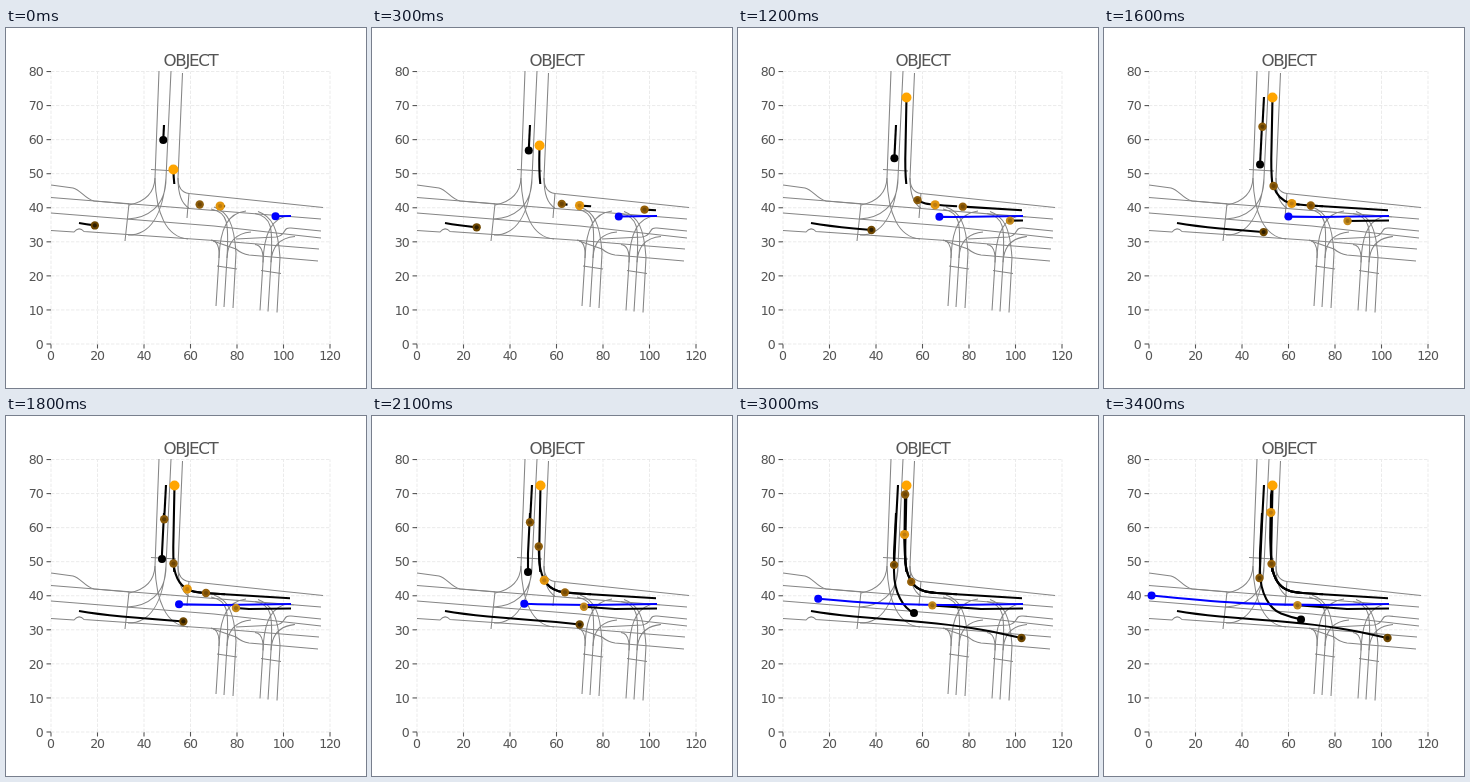
An HTML page for the animation above (3.5 s loop, 360 px wide and 360 px high).

```html
<!DOCTYPE html>
<html lang="en">
<head>
<meta charset="utf-8">
<title>Object tracks</title>
<style>
  html, body { margin: 0; width: 100%; height: 100%; overflow: hidden; background: #fff; }
  svg { display: block; width: 360px; height: 360px; }
  text { font: 12.5px "DejaVu Sans", sans-serif; letter-spacing: -1.1px; fill: #555; }
  .title { font-size: 16.67px; letter-spacing: -1.3px; text-anchor: middle; }
  .x { text-anchor: middle; }
  .y { text-anchor: end; }
  .grid { stroke: #e9e9e9; stroke-width: .9; stroke-dasharray: 3.4 1.6; }
  .tick { stroke: #555; stroke-width: 1.1; }
  #roads { fill: none; stroke: #858585; stroke-width: 1.05; }
  #trails { fill: none; stroke: #000; stroke-width: 2.1; stroke-linejoin: round; }
</style>
</head>
<body>
<svg viewBox="0 0 360 360">
  <g id="axes"></g>
  <text class="title" x="184.5" y="38">OBJECT</text>
  <g id="roads">
    <!-- main road -->
    <path d="M45 157L67 160C75 162 79 171 88 173L123 176"/>
    <path d="M45 169.500L183 180.500L315 191"/>
    <path d="M45 185L208 198L315 210"/>
    <path d="M45 202.500L68 204Q73 198 78 203.500L208 212.500L313 221"/>
    <path d="M172 150Q172 164 183 165.500L317 179.500"/>
    <path d="M230 211L270 209C281 208 276 199 285 200L315 203"/>
    <path d="M207 213L230 221Q236 226 243 227L312 233"/>
    <!-- northern arm -->
    <path d="M153 43L149 150Q148 172 123 177"/>
    <path d="M165 43L160 150C160 180 140 190 122 191M160 150C157 185 145 207 122 207"/>
    <path d="M176.500 45L172 150Q172 174 183 180"/>
    <path d="M149 150C150 185 160 209 182 211"/>
    <path d="M145 141.500L170 143M123 176L119 213M183 165L181 190"/>
    <!-- the two southern arms have the same shape -->
    <g id="arm">
      <path d="M210 278L213 230Q214 213 205 212M218 279L221 230M227 280L230 225"/>
      <path d="M213 230C214 200 222 185 240 183M221 230C223 195 222 184 205 181"/>
      <path d="M221 230Q222 206 245 204M230 225C228 195 222 184 208 179"/>
      <path d="M211 238L231 241"/>
    </g>
    <use href="#arm" x="44" y="4.500"/>
  </g>
  <g id="trails"></g>
  <g id="dots"></g>
</svg>
<script>
const STEP = 100, COUNT = 35;
const $ = id => document.getElementById(id);

function add(parent, tag, attrs, text = '') {
  const el = document.createElementNS('http://www.w3.org/2000/svg', tag);
  for (const name in attrs) el.setAttribute(name, attrs[name]);
  el.textContent = text;
  return $(parent).appendChild(el);
}

const line = (cls, x1, y1, x2, y2) => add('axes', 'line', { class: cls, x1, y1, x2, y2 });

for (let v = 0; v <= 120; v += 20) {
  const x = 45 + v * 2.325;
  line('grid', x, 316, x, 43.5);
  line('tick', x, 316, x, 320.5);
  add('axes', 'text', { class: 'x', x: x - .5, y: 331.5 }, v);
}
for (let v = 0; v <= 80; v += 10) {
  const y = 316 - v * 3.406;
  line('grid', 45, y, 324, y);
  line('tick', 40.5, y, 45, y);
  add('axes', 'text', { class: 'y', x: 36.5, y: y + 4.7 }, v);
}

const route = {
  east: 'M73 195Q90 198 116 200.5L158.5 204Q215 208 253.5 215.5L283.5 222',
  west: 'M285 188L217 189C150 188.5 120 187 47 179.5',
  yard: 'M285 192.5L243 193L193.5 189.3',
  south: 'M160 69L158 107L155.5 162',
  southEast: 'M158 97L156 137.5V155C156 178 166 193 177 197.5Q186 201 197.5 203.5',
  north: 'M168.3 156Q166.8 142 167.5 120L168.5 69.5',
  turn: 'M284 182.3L206 177.5Q190 176.5 186 175C172 171 167.5 158 167 140L166.5 122L167 79.5L168.5 69.5'
};

// Speeds are in pixels per step. A car loses up to "brake" of its cruising
// speed around the step "at", for about "width" steps, and halts at the route's end.
const cars = [
  { path: route.east, color: '#6e4700', core: '#2e1e00', head: 16, cruise: 11.5, brake: 9, at: 7, width: 9 },
  { path: route.southEast, color: '#000', r: 4, head: 15, cruise: 5.5, brake: 5.4, at: 9.5, width: 8 },
  { path: route.south, color: '#8a5a08', core: '#5f3e04', enter: 13, head: 16, cruise: 5.2, brake: 4.6, at: 19, width: 3 },
  { path: route.turn, color: '#8c5c0a', core: '#6d4505', tail: 88.5, head: 90.5, cruise: 5.8, brake: 5.6, at: 5, width: 7.5 },
  { path: route.turn, color: '#e2950c', core: '#bd7c10', r: 4.6, tail: 65, head: 70, cruise: 5.5, brake: 4.6, at: 7.5, width: 10.5 },
  { path: route.turn, color: '#966008', core: '#754b06', enter: 3, head: 11.5, cruise: 5.4, brake: 3.7, at: 22.5, width: 7 },
  { path: route.yard, color: '#c58a1c', core: '#9a6a10', enter: 12, head: 13, cruise: 7.2, brake: 7.2, at: 29, width: 7 },
  { path: route.north, color: '#ffa500', r: 5, head: 14.5, cruise: 8 },
  { path: route.west, color: '#00f', r: 4, head: 15.5, cruise: 8.2, brake: 4.6, at: 11.5, width: 7, stroke: '#00f' }
];

for (const car of cars) {
  const { path, color, core = color, r = 4.2, stroke = '#000' } = car;
  car.trail = add('trails', 'path', { d: path, stroke });
  car.dot = add('dots', 'g', {});
  car.dot.innerHTML = `<circle r="${r}" fill="${color}"/><circle r="2.1" fill="${core}"/>`;
}

function travelled({ enter = 0, head, cruise, brake = 0, at = 0, width = 1 }, now) {
  let sum = head;
  for (let t = enter + .5; t < now; t++) sum += cruise - brake * Math.exp(-(((t - at) / width) ** 2));
  return sum;
}

function draw() {
  const now = Math.floor(performance.now() / STEP) % COUNT;
  for (const car of cars) {
    const { trail, dot, enter = 0, tail = 0 } = car;
    dot.style.display = trail.style.display = now < enter ? 'none' : '';
    const s = Math.min(travelled(car, now), trail.getTotalLength());
    const { x, y } = trail.getPointAtLength(s);
    trail.setAttribute('stroke-dasharray', `0 ${tail} ${s - tail} 999`);
    dot.setAttribute('transform', `translate(${x} ${y})`);
  }
  requestAnimationFrame(draw);
}
draw();
</script>
</body>
</html>
```
